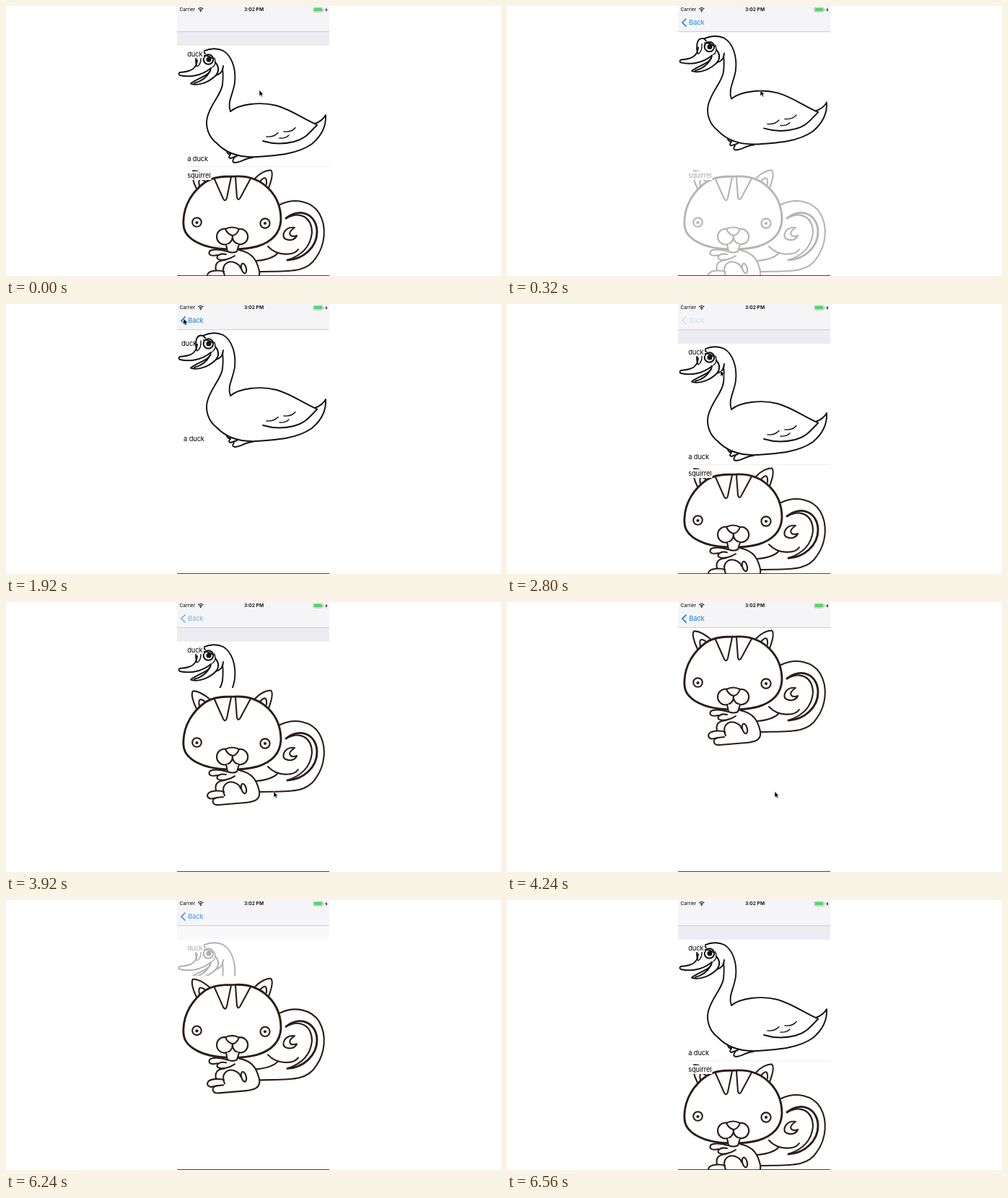
Animation, 686 px wide and 374 px high, one loop 6640 ms. Source, as an HTML page:

```html
<!DOCTYPE html>
<html lang="en">
<head>
<meta charset="utf-8">
<title>Animal list</title>
<style>
  html, body { margin: 0; width: 100%; height: 100%; overflow: hidden; background: #fff; }
  svg { display: block; width: 686px; height: 374px; }
  text { font: 9.3px Inter, "Liberation Sans", sans-serif; letter-spacing: -.1px; fill: #000; }
  .status { font-size: 6.6px; letter-spacing: 0; }
  .clock { font-size: 6.7px; font-weight: 600; letter-spacing: 0; }
  .blue { fill: #157bdc; }
  .ink { fill: none; stroke: #111; stroke-width: 1.9; stroke-linecap: round; stroke-linejoin: round; }
  .brown { stroke: #2b1c18; stroke-width: 2.1; }
  .bold { stroke-width: 2.9; }
  .thin { stroke-width: 1.4; }
</style>
</head>
<body>
<svg viewBox="0 0 686 374">
  <defs>
    <clipPath id="screen"><path d="M237 0h211v374h-211z"/></clipPath>

    <g id="duck">
      <path fill="#fff" d="M237 36h211v167h-211z"/>
      <g class="ink">
        <path d="M274 43.500C282 39.500 293 39 301 43C313 50 319 68 317 87C315 103 306 114 311 127"/>
        <path d="M311 127C323 117 352 113 375 119C396 125 411 137 431 145.500"/>
        <path d="M428 144C436 141 440 138 443 132C444 148 437 161 424 172C404 186 378 188 347 190C325 191 305 185 292 171C280 162 276 147 279 135C284 116 298 104 300 90C301 80 301 74 300 68"/>
        <path d="M431 146C420 157 415 165 399 169C383 173 369 172 356 168"/>
        <path class="thin" d="M361 162Q371 163 377 156.500M385 155Q396 156 401 149.500M379 164Q387 165 392 160"/>
        <path d="M264 64C262 55 263 46 268 44Q273 42 276 47"/>
        <path d="M265 56C264 66 259 72 241 73Q238 75 241 77C254 80 271 78 284 67"/>
        <path class="thin" d="M265 65Q271 61 270 51M286 66Q292 62 289 53"/>
        <path d="M284 67C283 78 267 80 256 88.500C268 93 283 85 291 77Q301 74 301 64"/>
        <path d="M261 88Q276 84 283 71M290 59Q298 68 291 77"/>
        <circle cx="280.500" cy="55" r="6.800" stroke-width="2"/>
        <circle cx="281" cy="55" r="2.600" fill="#111"/>
        <path d="M274 50Q280 49 287 54"/>
        <path d="M306 183Q308 188 312 185M311 187Q307 191 311 192L320 189M316 192Q312 197 317 198C326 198 332 191 342 191"/>
      </g>
    </g>

    <g id="squirrel">
      <path fill="#fff" d="M237 36h211v167h-211z"/>
      <g class="ink brown">
        <path class="bold" d="M246 108C247 88 258 69 276 56C288 48 304 48 318 48C338 47 352 53 364 65C376 77 381 93 381 108C380 128 368 139 348 145C325 151 287 151 266 140C248 131 245 121 246 108Z"/>
        <path d="M264 65C259 55 256 44 259 40.500Q267 39 283 52M268 61Q265 47 276 55M345 51C351 44 361 39 367 39.500C371 43 367 56 364 64M352 55Q362 44 361 59"/>
        <path d="M289 52L301 79Q304 84 306 78L312 49M318 49L320 77Q322 83 325 77L339 51"/>
        <circle cx="264.500" cy="111.500" r="6.300"/>
        <circle cx="359" cy="113" r="6.600"/>
        <g fill="#2b1c18" stroke="none"><circle cx="264.500" cy="112" r="2.100"/><circle cx="359" cy="113" r="2.100"/></g>
        <circle cx="303" cy="131.500" r="11"/>
        <circle cx="324.500" cy="131.500" r="10.700"/>
        <path fill="#fff" d="M304 121Q313 116 323 121Q320 129 314 130Q307 128 304 121Z"/>
        <path fill="#fff" d="M305 142L307 152Q314 155 320 152L323 142"/>
        <path d="M306 152C298 149 285 148 282 152C280 157 285 159 293 157M305 156C297 154 291 158 293 162C298 166 310 163 317 158"/>
        <path d="M323 150C343 154 348 166 351 179C353 191 344 194 331 195L295 198C285 199 284 190 292 188L301 187"/>
        <path d="M302 180C297 178 280 177 279 185C280 191 286 190 292 188M291 178Q288 165 303 164"/>
        <path d="M303 185C297 171 307 164 316 167Q324 170 325 175"/>
        <ellipse cx="329.500" cy="175.500" rx="3.300" ry="7" transform="rotate(-15 329.500 175.500)"/>
        <path d="M380 87C401 77 424 83 434 99C445 118 442 143 430 160C417 182 393 179 352 180"/>
        <path class="bold" d="M388 106C408 90 431 101 431 125C431 146 412 163 390 164"/>
        <path d="M388 106C408 95 424 105 424 126C422 147 408 158 390 164"/>
        <path d="M400 119C386 117 380 132 388 135C395 138 401 135 403 130C394 133 388 127 400 119Z"/>
        <path d="M405 149C399 158 376 159 363 145M347 165Q369 163 377 154"/>
      </g>
    </g>
  </defs>

  <path fill="#fff" d="M0 0h686v374H0z"/>
  <g clip-path="url(#screen)">
    <path fill="#edecf3" d="M237 36h211v19h-211z"/>
    <g id="cell-duck">
      <use href="#duck" y="19"/>
      <path fill="#fff" d="M251 60h23v12h-23z"/>
      <text x="251.200" y="69.500">duck</text>
      <text x="251.200" y="214.500">a duck</text>
    </g>
    <path fill="#e9e9ec" d="M251 222h197v.8h-197z"/>
    <g id="cell-squirrel">
      <use href="#squirrel" y="188"/>
      <path fill="#fff" d="M251 229h33.500v12h-33.500z"/>
      <text x="251.200" y="237.500">squirrel</text>
    </g>
    <path id="veil" fill="#fff" d="M237 36h211v338h-211z"/>
    <use id="hero"/>
    <g id="labels">
      <text id="name" x="243" y="58"/>
      <text id="info" x="246" y="190"/>
    </g>

    <path fill="#f5f5f7" d="M237 0h211v36h-211z"/>
    <path fill="#cfcfd3" d="M237 35h211v.9h-211z"/>
    <g id="back">
      <path d="M248.500 17.500L243 23l5.500 5.500" fill="none" stroke="#157bdc" stroke-width="1.700"/>
      <text class="blue" x="252.300" y="26.300">Back</text>
    </g>
    <text class="status" x="240.500" y="7.400">Carrier</text>
    <path d="M266.200 4Q269.700 .9 273.200 4M267.700 5.700Q269.700 4 271.700 5.700" fill="none" stroke="#000" stroke-width="1.100"/>
    <circle cx="269.700" cy="7.200" r=".9"/>
    <text class="clock" x="343.500" y="7.400" text-anchor="middle">3:02 PM</text>
    <rect x="426" y="2.300" width="12.800" height="5.800" rx="1.400" fill="#fff" stroke="#8d8d8d" stroke-width=".6"/>
    <rect x="426.900" y="3.100" width="11" height="4.200" rx=".8" fill="#4cd964"/>
    <path fill="#8d8d8d" d="M439.500 4.200h.8v2h-.8z"/>
    <path d="M444.600 2.300l-2.300 3.200h1.500l-.6 2.700 2.400-3.300h-1.500z"/>
    <path fill="#4b4046" d="M237 373h211v1h-211z"/>
  </g>
  <path id="cursor" d="M0 0V8.200L1.900 6.500L3.200 9.300L4.600 8.700L3.400 5.900H5.900Z" fill="#000" stroke="#fff" stroke-width=".5"/>
</svg>
<script>
  const LOOP = 6640, STEP = 80;
  const $ = id => document.getElementById(id);
  const clamp = x => Math.min(1, Math.max(0, x));
  const easeOut = x => 1 - Math.pow(1 - x, 1.6);

  // One visit per animal: push and pop start, time the labels appear, list offset.
  const visits = [
    { id: 'duck', push: 0, label: 720, pop: 2480, drop: 19 },
    { id: 'squirrel', push: 3760, label: 4480, pop: 6160, drop: 188 }
  ];

  // Pointer stops: time, x, y
  const stops = [
    [0, 351, 116.5], [1200, 351, 116.5], [1600, 262, 32], [1920, 246, 20], [2440, 246, 20],
    [2800, 296, 92], [3120, 366, 260], [3360, 371, 262.5], [4640, 371, 262.5],
    [5360, 257, 23], [5840, 267, 21], [6080, 267, 21], [6240, 267, 4]
  ];

  function pointer(t) {
    const i = stops.findIndex(s => s[0] > t);
    if (i < 0) return null;
    const [a, b] = [stops[i - 1], stops[i]];
    const x = (t - a[0]) / (b[0] - a[0]);
    const k = x * x * (3 - 2 * x);
    return [a[1] + (b[1] - a[1]) * k, a[2] + (b[2] - a[2]) * k];
  }

  function draw(t) {
    const visit = t < visits[1].push ? visits[0] : visits[1];
    const { id, push, label, pop, drop } = visit;
    const leaving = t >= pop;
    const enter = clamp((t - push) / 400);
    const leave = clamp((t - pop) / 320);
    const active = t > push && leave < 1;
    const lift = leaving ? 1 - easeOut(leave) : easeOut(enter);

    for (const v of visits)
      $('cell-' + v.id).style.visibility = active && v.id === id ? 'hidden' : 'visible';
    $('veil').style.opacity = leaving ? 1 - clamp(leave / .75) : clamp((enter - .4) / .6);
    $('hero').style.visibility = active ? 'visible' : 'hidden';
    $('hero').setAttribute('href', '#' + id);
    $('hero').setAttribute('y', drop * (1 - lift));

    $('labels').style.visibility = t >= label && !leaving ? 'visible' : 'hidden';
    $('name').textContent = id;
    $('info').textContent = 'a ' + id;
    $('back').style.opacity = leaving ? 1 - clamp((t - pop) / 380) : easeOut(enter);

    const at = pointer(t);
    $('cursor').style.visibility = at ? 'visible' : 'hidden';
    if (at) $('cursor').setAttribute('transform', `translate(${at})`);
  }

  const start = performance.now();
  function tick() {
    const t = (performance.now() - start) % LOOP;
    draw(t - t % STEP);
    requestAnimationFrame(tick);
  }
  tick();
</script>
</body>
</html>
```
